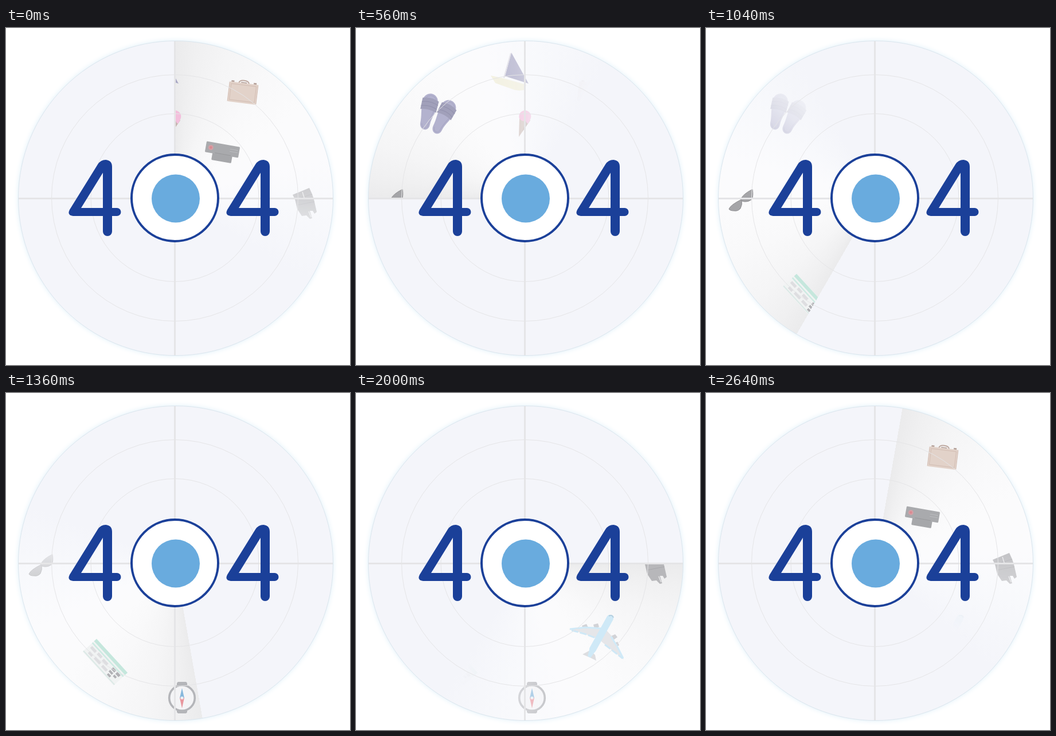
An HTML page that plays this animation: 600 by 588 pixels, repeating every 2.72 s.

```html
<!DOCTYPE html>
<html lang="en">
<head>
<meta charset="utf-8">
<title>404</title>
<style>
  html, body { margin: 0; width: 100%; height: 100%; overflow: hidden; background: #fff; }
  #stage { position: relative; width: 600px; height: 588px; overflow: hidden; --a: 0deg; }
  #stage > * { position: absolute; left: 0; top: 0; width: 600px; height: 588px; }
  #sweep {
    clip-path: circle(274.5px at 296px 297px);
    background: conic-gradient(from var(--a) at 295px 297px,
      #ebebec 0deg, #f0f0f1 8deg, #f5f5f6 20deg, #f9f9fa 38deg, #fbfbfc 55deg,
      #fbfbfd 75deg, #f8f9fc 95deg, #f4f5fa 122deg, #f4f5fa 360deg);
  }
  #things {
    --m: conic-gradient(from var(--a) at 295px 297px,
      #000 0deg, #000 62deg, rgba(0,0,0,.78) 78deg, rgba(0,0,0,.57) 91deg,
      rgba(0,0,0,.24) 104deg, transparent 120deg, transparent 360deg);
    -webkit-mask-image: var(--m);
    mask-image: var(--m);
  }
</style>
</head>
<body>
<div id="stage">
  <svg viewBox="0 0 600 588">
    <circle cx="296" cy="297" r="274.5" fill="#f4f5fa" style="filter:drop-shadow(0 0 4px #dceef8)"/>
  </svg>

  <div id="sweep"></div>

  <svg id="things" viewBox="0 0 600 588">
    <defs>
      <g id="slipper">
        <path fill="#b3b2ce" d="M-13-17C-13-37 14-37 14-16C14 0 8 8 8 22C8 35-8 35-9 22C-9 8-13 0-13-17Z"/>
        <path fill="none" stroke="#a6a5c2" d="M-10-17C-9-33 11-33 11-16C11 0 5 8 5 22C5 31-5 31-6 22"/>
        <path fill="#a1a0ba" d="M-14-22Q0-27 15-21L14-1Q0-6-14-2Z"/>
        <path fill="none" stroke="#9291ad" d="M-14-15Q0-20 15-14M-14-8Q0-13 14-7"/>
      </g>
    </defs>

    <g id="boat">
      <path fill="#f1efdc" d="M235 83L258 88L297 99L294 108Q281 111 271 106L243 96Z"/>
      <path fill="#a9a8c5" d="M271 43L301 97L260 84Z"/>
      <path fill="none" stroke="#dcdae2" stroke-width="2" d="M270 44L258 87"/>
    </g>

    <g id="cone">
      <path fill="#d3c5c0" d="M285 158L304 161L284 190Z"/>
      <path fill="#c6b6b2" d="M296 160L304 161L290 181Z"/>
      <path fill="#f3bfdc" d="M285 158A10.5 10.5 0 1 1 305 157Q303 163 300 167Q297 166 296 162Q290 164 285 158Z"/>
    </g>

    <g id="suitcase" transform="translate(413 113.500) rotate(7)">
      <path fill="none" stroke="#bfaaa2" stroke-width="2" d="M-9-17Q-8-22 0-22Q8-22 9-17"/>
      <path fill="#b5a29b" d="M-22-20h5v3h-5zM17-20h5v3h-5zM-5-19h10v2h-10z"/>
      <rect x="-25" y="-17.500" width="50" height="35" rx="2" fill="#e2d2c9"/>
      <rect x="-22" y="-14" width="44" height="28" fill="none" stroke="#d3beb4"/>
      <path stroke="#d3beb4" d="M-25-17V17M25-17V17"/>
    </g>

    <g id="camera" transform="translate(377.500 212) rotate(10)">
      <rect x="-16" y="8" width="35" height="13" rx="1.500" fill="#a6a7aa"/>
      <rect x="-29.500" y="-9.500" width="59" height="19" rx="1.500" fill="#a9aaad"/>
      <circle cx="-20.500" cy="0" r="4.500" fill="#d4a0a6"/>
      <circle cx="-20.500" cy="0" r="2.200" fill="#dc8890"/>
      <path stroke="#97989b" d="M-12 8H16"/>
      <path stroke="#bbbcbf" d="M13-3H27M13 1H27"/>
    </g>

    <g id="binoculars">
      <path fill="#b7b7ba" d="M500 291L529 279L534 290L537 299L542 321L538 324L535 319L530 319L534 332L530 333L524 327L516 328L508 316L504 299Z"/>
      <path fill="none" stroke="#a8a8ac" d="M504 299L534 290M508 309L538 303"/>
      <path stroke="#e6e6e8" stroke-width="1.500" d="M517 286L521 299M528 320L532 330"/>
    </g>

    <use href="#slipper" transform="translate(125.500 146) rotate(12)"/>
    <use href="#slipper" transform="translate(152.500 155.500) rotate(27)"/>

    <g id="shades" fill="#a5a5a8" stroke="#8f8f92">
      <path d="M40 316Q42 309 62 299Q64 308 60 315Q56 320 49 319Q42 319 40 316Z"/>
      <path d="M60.500 299Q65 289 81 281.500Q83 292 80 299Q74 304 67 303Q62 303 60.500 299Z"/>
    </g>

    <g id="ticket" transform="translate(158 429) rotate(47.500)">
      <rect width="80" height="33" fill="#f1f3f3"/>
      <rect width="80" height="6" fill="#c5e7dd"/>
      <path stroke="#cdeae2" stroke-width="2.500" d="M0 10H80"/>
      <path stroke="#dbe9e6" stroke-width="2" d="M0 31H80"/>
      <path fill="#dedee1" d="M4 14h12v5h-12zM20 13h10v5h-10zM34 14h12v5h-12zM8 23h9v5h-9zM22 22h14v5h-14zM41 22h12v5h-12z"/>
      <path fill="#b1b1b5" d="M56 12h8v5h-8zM67 12h8v5h-8zM56 19h8v4h-8zM67 19h6v4h-6zM58 25h7v4h-7z"/>
    </g>

    <g id="compass">
      <circle cx="307" cy="532" r="22.300" fill="#f4f4f6" stroke="#b4b5b9" stroke-width="3.600"/>
      <path fill="#b4b5b9" d="M300 504H314L316 506V510H298V506ZM298 553H316V557L314 559H300L298 557Z"/>
      <path fill="#86b7dc" d="M307 515L311 532H303Z"/>
      <path fill="#e8969d" d="M307 550L303 532H311Z"/>
      <circle cx="307" cy="532" r="2.600" fill="#eef0f4"/>
    </g>

    <g id="plane">
      <path fill="#dddee1" d="M395 456L408 449L417 457L419 467L409 462Z"/>
      <path fill="#d2d3d7" d="M394 406l8-3 3 6-8 4zM414 404l8-2 2 6-8 4zM445 424l7-3 4 5-7 5zM450 437l6-3 3 6-6 4z"/>
      <path fill="#e5e6e9" d="M371 412L400 408L434 411L446 424L457 443L467 465L438 442L424 430L398 420Z"/>
      <path fill="none" stroke="#d0eaf8" stroke-width="3" d="M373 412L400 409L431 411M445 425L456 443L466 463"/>
      <path fill="none" stroke="#cfe8f6" stroke-width="3" stroke-dasharray="12 3" d="M376 414L398 420L420 428M434 439L465 463"/>
      <path stroke="#cfe9f7" stroke-width="12" stroke-linecap="round" d="M443 393L413 447"/>
      <path fill="#cfe9f7" d="M408 444L418 450L409 462L404 459Z"/>
      <path fill="none" stroke="#b4cfdf" stroke-width="2" d="M441 389Q447 386 449 392"/>
    </g>
  </svg>

  <svg viewBox="0 0 600 588" fill="none" role="img" aria-label="404">
    <g stroke="#e5e5e7">
      <circle cx="294.500" cy="296.500" r="215"/>
      <circle cx="294.500" cy="296" r="146.500"/>
      <path stroke-width="3" d="M294.500 23V571M22 297.500H570"/>
    </g>
    <circle cx="296" cy="297" r="274.500" stroke="#dbe6ee"/>
    <circle cx="294.500" cy="296.500" r="75.500" fill="#fff" stroke="#1b4099" stroke-width="4"/>
    <circle cx="296" cy="297.500" r="42" fill="#69abde"/>
    <g fill="#1b4099" fill-rule="evenodd">
      <path id="four" d="M185 242V314H193.500a7 7 0 0 1 0 14H185V355a8 8 0 0 1-16 0V328H117Q106 327 111 317L160 238Q165 230 174 230Q185 231 185 242ZM169 314V252.500L131 314Z"/>
      <use href="#four" x="275"/>
    </g>
  </svg>
</div>
<script>
  const LOOP = 2720, STEP = 80;
  const stage = document.getElementById("stage");

  // Ten degrees per step; two steps early in the turn are doubled.
  function draw(t) {
    const n = Math.floor((t % LOOP) / STEP);
    const turn = 10 * (n + (n > 2) + (n > 6));
    stage.style.setProperty("--a", -turn + "deg");
  }

  const start = performance.now();
  function tick() {
    draw(performance.now() - start);
    requestAnimationFrame(tick);
  }
  draw(0);
  requestAnimationFrame(tick);
</script>
</body>
</html>
```
